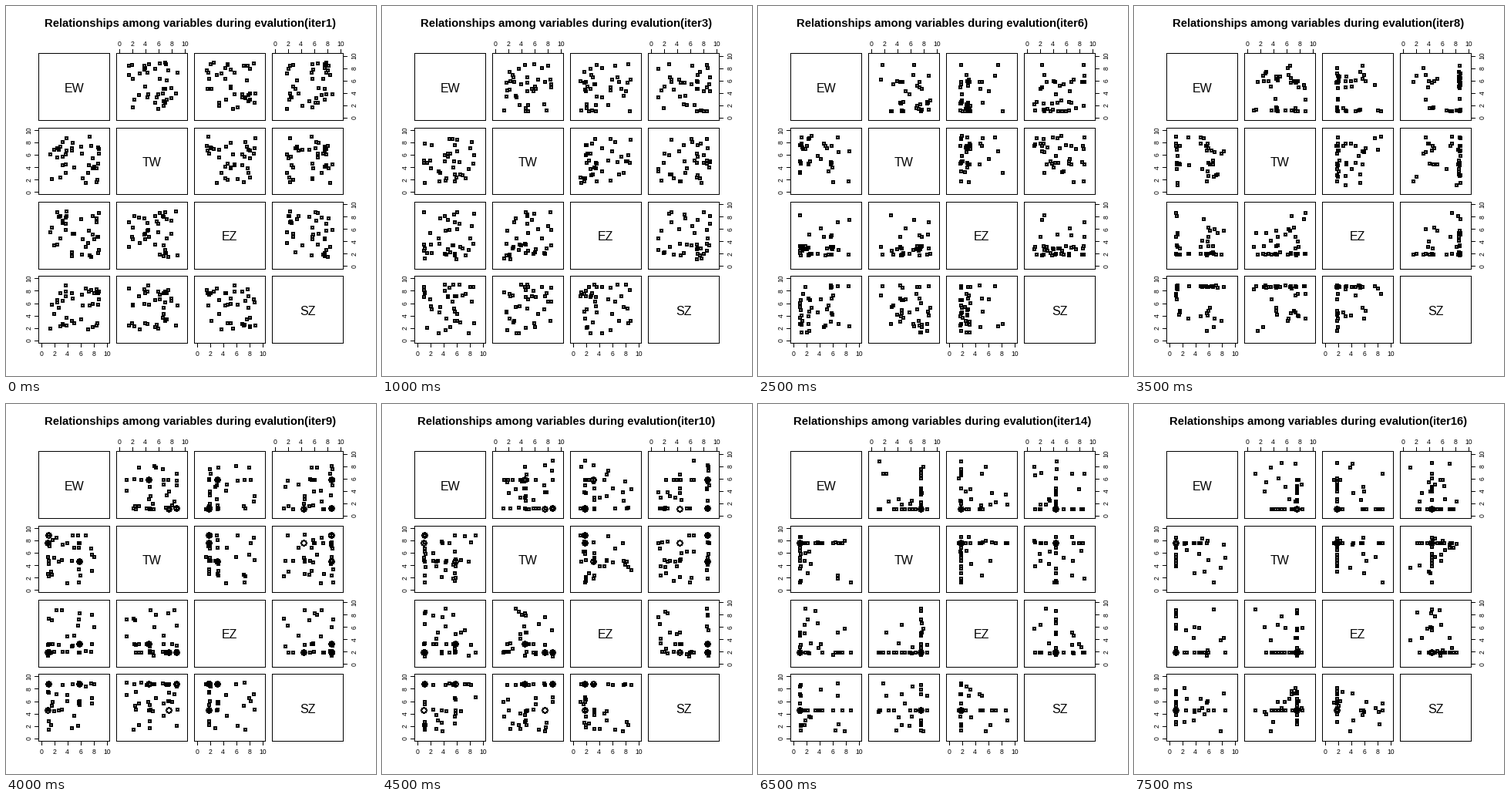
Recreate the animation shown at these times as a matplotlib script. Size 480 px wide and 480 px high, loop 8 s.

```python
import numpy as np
import matplotlib.pyplot as plt
from matplotlib.animation import FuncAnimation
from matplotlib.patches import Rectangle

SIZE, DPI = 480, 80
PT = 72 / DPI                       # points per pixel
NAMES = ["EW", "TW", "EZ", "SZ"]
COUNT, GENERATIONS = 38, 16
LEFT, BOTTOM = 42.2, 148.2          # first panel, lower left corner
STEP_X, STEP_Y = 101, 96.25
WIDTH, HEIGHT = 92, 86.8
LOW, SPAN = -0.4, 10.8              # axis limits -0.4 .. 10.4

# fittest individuals, best first, and how strongly each variable is inherited
FITTEST = np.array([(1.1, 7.6, 1.9, 4.5), (1.2, 8.8, 1.9, 8.7),
                    (5.8, 4.6, 3.2, 8.7), (2.4, 3.4, 2.7, 7.5)])
INHERIT = np.array([0.6, 0.35, 0.55, 0.35])

plt.rcParams["font.family"] = "Liberation Sans"
plt.rcParams["path.simplify"] = False


def population(gen):
    """Individuals start random, then inherit from ever fewer parents."""
    rng = np.random.default_rng(40 + gen)
    points = rng.uniform(1.1, 9, (COUNT, 4))
    parents = FITTEST[:round((18 - gen) / 3)]
    spread = 0.4 * (1 - gen / GENERATIONS) ** 2
    pick = rng.integers(len(parents), size=points.shape)
    genes = parents[pick, np.arange(4)] + rng.normal(0, spread, points.shape)
    chance = INHERIT * min(1, (gen - 1) / 5)
    points = np.where(rng.random(points.shape) < chance, genes, points)
    marked = parents if gen > GENERATIONS / 2 else parents[:0]
    return np.clip(points, 1.1, 9), marked


def to_x(col, value):
    return LEFT + col * STEP_X + (value - LOW) / SPAN * WIDTH


def to_y(row, value):
    return BOTTOM + row * STEP_Y - (value - LOW) / SPAN * HEIGHT


def rings(points, radius):
    """Circle outlines in all off-diagonal panels as one broken line."""
    pairs = [(r, c) for r in range(4) for c in range(4) if r != c]
    x = np.concatenate([to_x(c, points[:, c]) for _, c in pairs])
    y = np.concatenate([to_y(r, points[:, r]) for r, _ in pairs])
    turn = np.append(np.linspace(0, 2 * np.pi, 25), np.nan)
    xs = np.floor(x)[:, None] + 0.5 + radius * np.cos(turn)
    ys = np.floor(y)[:, None] + 0.5 + radius * np.sin(turn)
    return xs.ravel(), ys.ravel()


fig = plt.figure(figsize=(SIZE / DPI, SIZE / DPI), dpi=DPI, facecolor="white")
ax = fig.add_axes([0, 0, 1, 1])
ax.set(xlim=(0, SIZE), ylim=(SIZE, 0))
ax.axis("off")


def line(x, y):
    return ax.plot(x, y, color="black", lw=PT, antialiased=False,
                   solid_capstyle="butt")[0]


def tick_label(x, y, value, angle=0):
    ax.text(x, y, str(value), size=8.6 * PT, rotation=angle,
            ha="center", va="center")


def x_axis(col, edge, side):
    for v in range(0, 11, 2):
        x = to_x(col, v)
        line([x, x], [edge, edge + 5 * side])
        tick_label(x, edge + (15 if side > 0 else 12) * side, v)


def y_axis(row, edge, side):
    for v in range(0, 11, 2):
        y = to_y(row, v)
        line([edge, edge + 5 * side], [y, y])
        tick_label(edge + (15 if side > 0 else 12) * side, y, v, 90)


for i, name in enumerate(NAMES):
    for c in range(4):
        corner = LEFT + c * STEP_X, BOTTOM + i * STEP_Y - HEIGHT
        ax.add_patch(Rectangle(corner, WIDTH, HEIGHT, fill=False, lw=PT,
                               ec="black", antialiased=False))
    ax.text(LEFT + i * STEP_X + WIDTH / 2, 112 + i * STEP_Y, name,
            size=16 * PT, ha="center", va="baseline")

right, floor, top = LEFT + 3 * STEP_X + WIDTH, BOTTOM + 3 * STEP_Y, BOTTOM - HEIGHT
for i in (0, 2):
    x_axis(i, floor, 1)
    x_axis(i + 1, top, -1)
    y_axis(i, right, 1)
    y_axis(i + 1, LEFT, -1)

title = ax.text(239.2, 27, "", size=14.85 * PT, weight="bold",
                ha="center", va="baseline")
small, large = line([], []), line([], [])


def update(i):
    points, marked = population(i + 1)
    title.set_text(f"Relationships among variables during evalution(iter{i + 1})")
    small.set_data(*rings(points, 1.7))
    large.set_data(*rings(marked, 3.3))
    return title, small, large


anim = FuncAnimation(fig, update, frames=GENERATIONS, interval=500,
                     repeat=True, repeat_delay=0)
plt.show()
```
